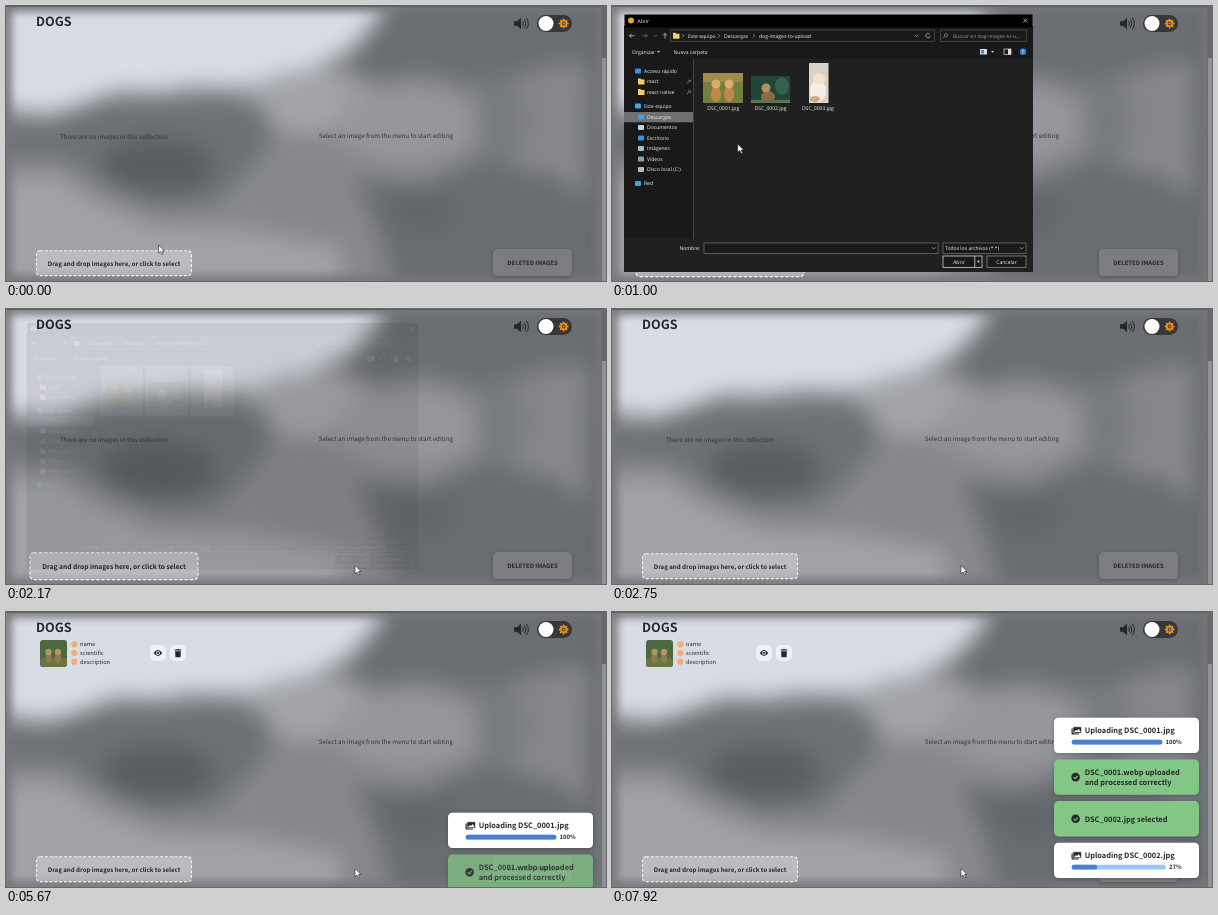
These frames come from a looping animation (600 by 275 pixels, 8 s). An HTML page:

```html
<!DOCTYPE html>
<html lang="en">
<head>
<meta charset="utf-8">
<title>Dog gallery upload</title>
<style>
  html, body { margin: 0; width: 100%; height: 100%; overflow: hidden; background: #85878c; }
  svg { display: block; width: 100vw; height: 100vh; text-rendering: geometricPrecision; }
  text { white-space: pre; }
  .page { font-family: "Noto Sans CJK JP", "Noto Sans CJK SC", "Noto Sans CJK", "Open Sans", sans-serif; }
  .window { font-family: "Open Sans", "Noto Sans", sans-serif; }
</style>
</head>
<body>
<svg id="stage" viewBox="0 0 600 275"></svg>
<script>
const DURATION = 8;
const INK = '#25272a';
const stage = document.getElementById('stage');

// Markup helpers
const rect = (x, y, w, h, fill, more = '') =>
  `<rect x="${x}" y="${y}" width="${w}" height="${h}" fill="${fill}" ${more}/>`;
const circle = (x, y, r, fill, more = '') => `<circle cx="${x}" cy="${y}" r="${r}" fill="${fill}" ${more}/>`;
const ellipse = (x, y, rx, ry, fill, more = '') =>
  `<ellipse cx="${x}" cy="${y}" rx="${rx}" ry="${ry}" fill="${fill}" ${more}/>`;
const shape = (d, fill, more = '') => `<path d="${d}" fill="${fill}" ${more}/>`;
const line = (d, color, width = 0.7, more = '') =>
  `<path d="${d}" fill="none" stroke="${color}" stroke-width="${width}" ${more}/>`;
const text = (x, y, size, str, fill = INK, more = '') =>
  `<text x="${x}" y="${y}" font-size="${size}" fill="${fill}" ${more}>${str}</text>`;
const group = (content, more = '') => `<g ${more}>${content}</g>`;
const bold = 'font-weight="600"';
const centered = 'text-anchor="middle"';

// Timing helpers
const clamp = v => Math.min(1, Math.max(0, v));
const ramp = (t, start, length) => clamp((t - start) / length);
const easeOut = p => 1 - (1 - p) ** 3;
const smooth = p => p * p * (3 - 2 * p);
function track(keys, t, ease = p => p) {
  const next = keys.findIndex(key => key[0] > t);
  if (next < 0) return keys[keys.length - 1].slice(1);
  if (next === 0) return keys[0].slice(1);
  const [t0, ...from] = keys[next - 1], [t1, ...to] = keys[next];
  const p = ease((t - t0) / (t1 - t0));
  return from.map((v, i) => v + (to[i] - v) * p);
}

function backdrop() {
  const hills =
    rect(-60, -60, 720, 400, '#86888d') +
    shape('M-60-60H390L372 12L345 42L300 66L235 82L190 80L150 86L110 84L85 96L45 108L-60 96Z', '#d9dce5') +
    ellipse(305, 96, 62, 32, '#a2a4aa') +
    ellipse(400, 118, 72, 38, '#96979c') +
    // Woods on the left slope
    shape('M-60 114L40 116L90 96L150 96L220 92L262 104L265 138L238 170L208 198L150 200L95 176L55 152L-60 150Z', '#6d7175') +
    ellipse(152, 160, 56, 28, '#5a5e62') +
    // Woods at the top right
    shape('M338 62L368 24L400 -40H660V60L560 56L470 80L415 66L375 74Z', '#6a6d71') +
    ellipse(495, 115, 24, 45, '#777a7e') +
    ellipse(545, 105, 26, 48, '#84868a') +
    // Lower slopes
    ellipse(305, 185, 58, 34, '#85878c') +
    shape('M-60 172L50 168L95 198L150 220L240 224L335 242V330H-60Z', '#a1a2a8') +
    shape('M350 172L415 180L475 152L555 172L610 220V330H400L375 232Z', '#696c71') +
    ellipse(415, 205, 36, 24, '#63666b') +
    ellipse(596, 150, 14, 180, '#65686c');
  return group(hills, 'filter="url(#haze)"') +
    rect(0, 0, 595, 275, 'none', 'stroke="#73767a" stroke-width="11" filter="url(#edge)"') +
    rect(0, 0, 600, 0.8, '#55585b') +
    rect(595.5, 0, 4.5, 275, '#66686b') + rect(596, 52, 4, 223, '#919295');
}

function header() {
  let rays = '';
  for (let i = 0; i < 8; i++) {
    const a = i * Math.PI / 4;
    rays += circle(557.6 + 4 * Math.cos(a), 17.5 + 4 * Math.sin(a), 1, '#f59415');
  }
  return text(30, 19.6, 12.6, 'DOGS', INK, bold) +
    shape('M508 15.2H511L515 11.8V23.2L511 19.8H508Z', INK) +
    line('M516.7 15.3Q518.3 17.5 516.7 19.7M518.5 13.5Q521.3 17.5 518.5 21.5M520.3 11.8Q524.5 17.5 520.3 23.2', INK, 1) +
    rect(531, 9, 35, 17, '#35373a', 'rx="8.5"') + circle(540, 17.5, 7.5, '#fff') +
    rays + circle(557.6, 17.5, 2.7, 'none', 'stroke="#f59415" stroke-width="1.6"') + circle(557.6, 17.5, 1, '#f59415');
}

const dropZone =
  rect(30.5, 244.8, 155, 24.8, '#fff', 'fill-opacity=".28" stroke="#f2f2f4" stroke-width="1.1" stroke-dasharray="3 1.8" rx="3.5"') +
  text(108, 259.5, 6.12, 'Drag and drop images here, or click to select', INK, `${bold} ${centered}`);

const deletedButton =
  rect(487, 243, 79, 27, '#7b7d81', 'rx="4.5" filter="url(#shadow)"') +
  text(526.5, 259.2, 5.95, 'DELETED IMAGES', INK, `${bold} ${centered}`);

function imageRow() {
  const labels = ['name', 'scientific', 'description'].map((label, i) =>
    circle(68.3, 32.3 + 8.7 * i, 3.1, '#f7ad72') + text(74, 34.4 + 8.7 * i, 5.7, label)).join('');
  const dogs = [42.5, 52].map(x =>
    ellipse(x, 46, 3.2, 5, '#8f7a50') + circle(x, 40, 3.2, '#b3935f')).join('');
  return rect(34, 28, 27, 27, '#4c6840', 'rx="3"') + rect(34, 46, 27, 9, '#6b7444', 'rx="3"') + dogs + labels +
    rect(144, 33, 16, 16, '#eff1f5', 'rx="5"') + rect(164, 33, 16, 16, '#eff1f5', 'rx="5"') +
    shape('M147.7 41Q152 35 156.3 41Q152 47 147.7 41Z', INK) + circle(152, 41, 1.9, '#eff1f5') + circle(152, 41, 1.1, INK) +
    shape('M168.6 37.6H170.5L171 36.9H173L173.5 37.6H175.4V38.6H168.6ZM169.1 39.3H174.9L174.5 45.2H169.5Z', INK);
}

// File dialog
const win = (x, y, str, more = '', fill = '#f2f2f2') => text(x, y, 5.05, str, fill, more);
const outline = (x, y, w, h, color) => rect(x, y, w, h, '#191919', `stroke="${color}" stroke-width=".7"`);
const folder = (x, y) => shape(`M${x} ${y - 3}h2.5l1 1h3v5h-6.5z`, '#f3cf63');

const titleBar =
  rect(12.5, 8.5, 408, 13, '#000') + circle(19, 14.5, 3, '#e3a83a') + win(25.5, 16.6, 'Abrir') +
  line('M411.3 12.5l4 4m0-4l-4 4', '#eee');

const loadingPane =
  rect(12.5, 21, 408, 245, '#37383b') + rect(12.5, 21.5, 408, 32, '#fff') +
  rect(81, 53, 339.5, 180, '#eeeff1') + rect(12.5, 53, 68.5, 180, '#222') +
  [[69, 237.5, 21, 7], [92, 236, 233, 10.5], [330, 236, 83, 10.5], [330, 249, 39, 11.5], [374, 249, 39, 11.5], [413, 258, 7.5, 8]]
    .map(box => rect(...box, '#f4f4f5')).join('');

function filePane() {
  const places = [
    ['Acceso rápido', 65, 0, '#3d8ee6'], ['react', 75.5, 3], ['react native', 86, 3],
    ['Este equipo', 100, 0, '#45a5e8'], ['Descargas', 111, 3, '#3f9ff0'], ['Documentos', 121.5, 3, '#c6d2dc'],
    ['Escritorio', 132, 3, '#2d9be3'], ['Imágenes', 142.5, 3, '#8fc3e2'], ['Vídeos', 153, 3, '#8d9db0'],
    ['Disco local (C:)', 163.5, 3, '#b5bac0'], ['Red', 177.5, 0, '#4a9fe0']
  ].map(([name, y, indent, color]) =>
    (color ? rect(23 + indent, y - 2.6, 6, 5.2, color, 'rx="1"') : folder(26, y)) + win(32 + indent, y + 1.8, name)).join('');
  const pins = [75.5, 86].map(y => line(`M75 ${y + 2}l2-2m-.7-1.7l2.4 2.4m-1-2.4l1.4 1.4`, '#aaa')).join('');
  const crumbs = [[76, 'Este equipo'], [112, 'Descargas'], [147, 'dog-images-to-upload']]
    .map(([x, name]) => line(`M${x - 6} 28l1.8 1.8l-1.8 1.8`, '#aaa') + win(x, 31.7, name)).join('');
  return rect(12, 20, 409, 246, '#202020') + rect(12, 20, 409, 33, '#191919') +
    rect(12, 53, 69, 180, '#191919') + rect(81, 53, 0.8, 180, '#4a4a4a') + rect(12, 106, 69, 10.3, '#707070') +
    line('M22.5 29.8h-5m2-2l-2 2l2 2M53 32.5v-5m-2 2l2-2l2 2', '#ddd') +
    line('M30.5 29.8h5m-2-2l2 2l-2 2M42 29l1.5 1.5l1.5-1.5', '#777') +
    outline(58.5, 24, 264, 11.3, '#555') + folder(61, 29.8) + crumbs +
    line('M303 29l1.7 1.7l1.7-1.7M317.5 28a2.2 2.2 0 1 0 .7 2', '#ccc') +
    outline(328.5, 24, 86, 11.3, '#555') + circle(334, 29.2, 1.6, 'none', 'stroke="#aaa" stroke-width=".6"') +
    line('M332.8 30.4l-1.5 1.5', '#aaa') + win(341, 31.7, 'Buscar en dog-images-to-u...', '', '#999') +
    win(20, 47.7, 'Organizar') + shape('M45 45h3l-1.5 1.8z', '#ddd') + win(61.5, 47.7, 'Nueva carpeta') +
    rect(368, 43, 7, 5.5, '#ddd') + rect(369, 44, 3, 3.5, '#2e8be0') + shape('M379 45h3l-1.5 1.8z', '#ddd') +
    rect(392, 43, 7, 5.5, 'none', 'stroke="#ddd" stroke-width=".7"') + rect(396, 43, 3, 5.5, '#ddd') +
    circle(411, 45.8, 3.2, '#2586dc') + win(411, 47.6, '?', `${centered} ${bold}`) +
    places + pins +
    win(67.5, 244.2, 'Nombre:') + outline(92, 237, 234, 10.3, '#777') + line('M320 241.3l1.7 1.7l1.7-1.7', '#ccc') +
    outline(331, 237, 83, 10.3, '#777') + win(333, 244.2, 'Todos los archivos (*.*)') + line('M408 241.3l1.7 1.7l1.7-1.7', '#ccc') +
    outline(331, 250, 39, 11.3, '#eee') + win(347, 257.5, 'Abrir', centered) +
    rect(362.5, 250, 0.7, 11.3, '#eee') + shape('M365 254.8h3l-1.5 1.9z', '#eee') +
    outline(375, 250, 39, 11.3, '#999') + win(394.5, 257.5, 'Cancelar', centered);
}

const tileX = [89, 136.3, 183.7];
const tiles = tileX.map((x, i) => rect(x, 54, 44.5, 52, '#757575', `id="tile${i}"`)).join('');
const thumbnails =
  rect(91, 67, 40, 30, '#71803f') + rect(91, 67, 40, 9, '#a08a4c') +
  [104, 117].map(x => ellipse(x, 88, 5, 8, '#bd8849') + circle(x, 78, 4.5, '#d8ae73')).join('') +
  rect(139, 70, 39, 27, '#234438') + ellipse(170, 80, 7, 9, '#33614b') + ellipse(156, 91, 7, 6, '#8d6a49') +
  circle(154, 82, 4.5, '#b88d5c') + rect(139, 94, 39, 3, '#58764a') +
  rect(197, 57, 19.5, 40, '#d9d2c9') + ellipse(206, 85, 8, 11, '#f5eee4') + circle(207, 73, 6, '#f3e3ce') + ellipse(203, 93, 5, 3, '#d9a57b') +
  tileX.map((x, i) => win(x + 22.2, 103.8, `DSC_000${i + 1}.jpg`, centered)).join('');

// Notifications: slots are stacked upwards from the bottom right corner
const SLOT = 41.7, BOTTOM = 230.8;
const toasts = [
  { lines: ['DSC_0001.jpg selected'], start: 2.75, end: 4.7 },
  { lines: ['Uploading DSC_0001.jpg'], start: 2.92, progress: [[2.95, 0], [4.25, 18], [5.45, 100]] },
  { lines: ['DSC_0001.webp uploaded', 'and processed correctly'], start: 5.55 },
  { lines: ['DSC_0002.jpg selected'], start: 6.3 },
  { lines: ['Uploading DSC_0002.jpg'], start: 6.47, progress: [[6.5, 0], [7.92, 27], [8, 29]] }
];

function toastMarkup({ lines, progress }, i) {
  const card = rect(442, 0, 145, 35.3, progress ? '#fff' : '#82c785', 'rx="4.5" filter="url(#shadow)"');
  const first = progress ? 15.6 : lines.length > 1 ? 15.3 : 20.5;
  const label = lines.map((str, n) => text(472.7, first + 10.3 * n, 7.42, str, INK, bold)).join('');
  const icon = progress
    ? rect(459.5, 10.5, 7.5, 6.3, INK, 'rx="1"') + rect(461, 9, 8.5, 6.5, INK, 'rx="1" stroke="#fff" stroke-width=".6"') +
      shape('M462 14.4l2-2.3l1.1 1l1.6-2l2 3.3z', '#fff')
    : circle(463.6, 17.7, 4.3, INK) + line('M461.6 17.8l1.5 1.5l2.7-2.9', '#82c785', 1.1);
  const bar = progress
    ? rect(459.7, 22, 94, 4.8, '#9cc6fb', 'rx="2.2" class="rail"') + rect(459.7, 22, 0, 4.8, '#4a7fd4', 'rx="2.2" class="fill"') +
      text(569.7, 26.7, 5.95, '', INK, `${bold} text-anchor="end" class="percent"`)
    : '';
  return group(card + label + icon + bar, `id="toast${i}"`);
}

stage.innerHTML = `<defs>
  <filter id="haze" filterUnits="userSpaceOnUse" x="-60" y="-60" width="720" height="400" color-interpolation-filters="sRGB"><feGaussianBlur stdDeviation="11"/></filter>
  <filter id="edge" filterUnits="userSpaceOnUse" x="-20" y="-20" width="640" height="320"><feGaussianBlur stdDeviation="4"/></filter>
  <filter id="shadow" x="-10%" y="-30%" width="120%" height="160%"><feDropShadow dx="0" dy="1" stdDeviation="2" flood-opacity=".25"/></filter>
  <clipPath id="frame"><rect width="600" height="275"/></clipPath></defs>` +
  group(
    group(backdrop()) + header() +
    text(54, 133.2, 6.24, 'There are no images in this collection', '#303236', 'id="empty"') +
    text(312.8, 132.4, 6.24, 'Select an image from the menu to start editing', '#303236') +
    group(imageRow(), 'id="row"') + group(dropZone, 'id="drop"') + deletedButton +
    toasts.map(toastMarkup).join(''), 'class="page" clip-path="url(#frame)"') +
  group(
    group(loadingPane, 'id="loading"') +
    group(filePane() + tiles + thumbnails +
      win(94, 244.2, '', 'id="fileNames"'), 'id="files"') +
    titleBar, 'id="dialog" class="window"') +
  shape('M0 0V8.2L2 6.5L3.4 9.5L4.8 8.9L3.4 6H6Z', '#fff', 'id="cursor" stroke="#222" stroke-width=".6"');

const el = id => document.getElementById(id);
const set = (node, values) => Object.entries(values).forEach(([name, value]) => node.setAttribute(name, value));
const show = (id, visible) => set(el(id), { visibility: visible ? 'inherit' : 'hidden' });
const scaleAt = (x, y, s) => `translate(${x} ${y}) scale(${s}) translate(${-x} ${-y})`;

const cursorPath = [
  [0, 152.5, 239], [0.1, 151, 241], [0.4, 136, 250], [0.75, 136, 250], [1.15, 121, 87],
  [1.67, 121, 87], [1.98, 349, 256.5]
];

function drawDialog(t) {
  const opening = easeOut(ramp(t, 0.54, 0.12));
  const closing = ramp(t, 2.05, 0.2);
  const loaded = t >= 0.75;
  show('dialog', t > 0.54 && closing < 1);
  set(el('dialog'), {
    opacity: (loaded ? 1 : 0.94 * opening) * (1 - closing) ** 2.8,
    transform: scaleAt(216, 137, 0.92 + 0.08 * opening - 0.07 * closing)
  });
  show('loading', !loaded);
  show('files', loaded);
  const selected = t < 1.25 ? 0 : t < 1.48 ? 1 : 3;
  tileX.forEach((_, i) => set(el('tile' + i), {
    opacity: i < selected ? 1 : i === 0 && t > 1.1 ? 0.45 : 0
  }));
  const names = [1, 2, 3].slice(0, selected).map(n => `DSC_000${n}.jpg`);
  el('fileNames').textContent = names.length > 1 ? names.map(name => `"${name}"`).join(' ') : names.join('');
}

function drawToasts(t) {
  const entered = toasts.map(({ start }) => easeOut(ramp(t, start, 0.35)));
  toasts.forEach(({ end = Infinity, progress }, i) => {
    const slots = entered.slice(i).reduce((sum, p) => sum + p, 0);
    const node = el('toast' + i);
    set(node, {
      transform: `translate(0 ${BOTTOM + SLOT * (1 - slots)})`,
      opacity: entered[i] * (1 - ramp(t, end, 0.25))
    });
    if (!progress) return;
    const percent = Math.floor(track(progress, t)[0] + 0.01);
    const label = percent + '%';
    const width = 104.3 - 3.4 * label.length;
    set(node.querySelector('.rail'), { width });
    set(node.querySelector('.fill'), { width: width * percent / 100 });
    node.querySelector('.percent').textContent = label;
  });
}

function draw(t) {
  const hover = smooth(ramp(t, 0.1, 0.25)) * (1 - smooth(ramp(t, 2.15, 0.25)));
  set(el('drop'), { transform: scaleAt(108, 257.2, 1 + 0.085 * hover) });
  show('empty', t < 5.5);
  show('row', t >= 5.5);
  drawDialog(t);
  drawToasts(t);
  const [x, y] = track(cursorPath, t, smooth);
  set(el('cursor'), { transform: `translate(${x} ${y})` });
}

const begin = performance.now();
function tick() {
  draw((performance.now() - begin) / 1000 % DURATION);
  requestAnimationFrame(tick);
}
tick();
</script>
</body>
</html>
```
